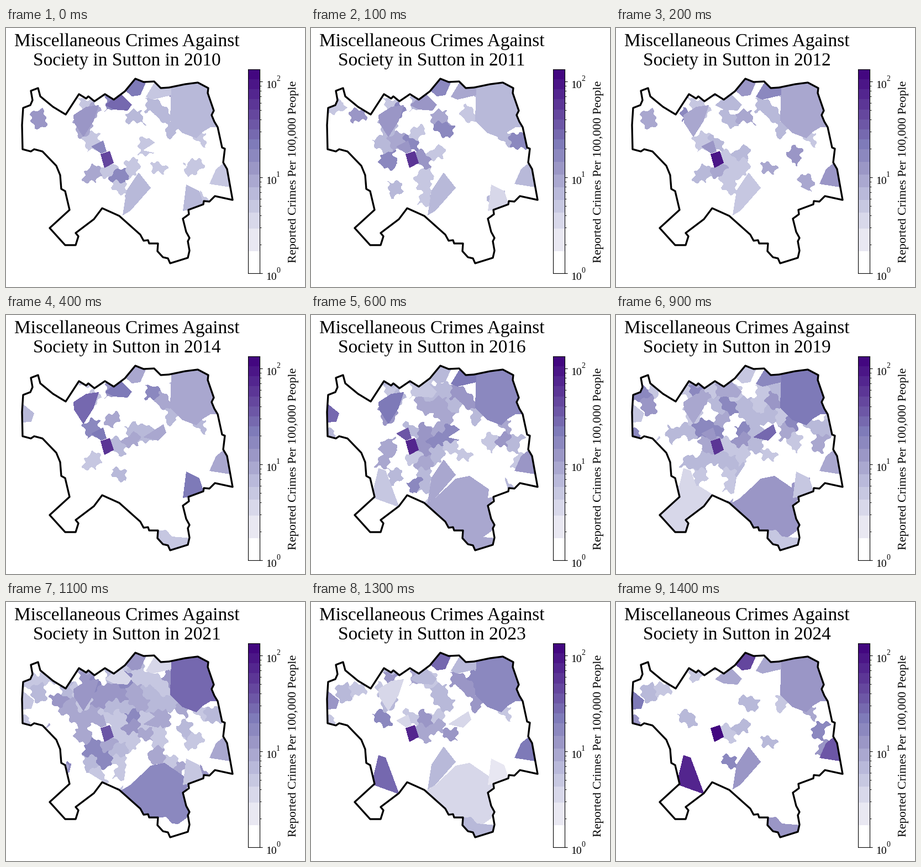
These frames come from a looping animation (541x470 px, 1500 ms). A matplotlib script:

```python
import matplotlib.pyplot as plt
import numpy as np
from matplotlib.animation import FuncAnimation
from matplotlib.patches import Polygon
from matplotlib.path import Path

W, H, DPI = 541, 470, 100
YEARS = np.arange(2010, 2025)
KEY_YEARS = (2010, 2012, 2014, 2016, 2018, 2021, 2024)
DECADE = 174  # pixels per factor of ten on the colour scale
BAR_LEFT, BAR_RIGHT, BAR_TOP, BAR_BASE = 438, 459, 75, 445
CELL = 25  # typical distance between neighbouring small areas
HUB = (220, 180)

plt.rcParams["font.family"] = "Liberation Serif"
rng = np.random.default_rng(12)

# Colour steps: wide at the pale end, then even
step_heights = [40, 41, 29] + [23] * 5 + [18.125] * 8
edges = BAR_BASE - np.cumsum([0] + step_heights)
middles = (edges[:-1] + edges[1:]) / 2
colours = plt.cm.Purples((BAR_BASE - middles) / (BAR_BASE - BAR_TOP))
colours[0] = 1

# Borough boundary, clockwise from the north-west corner
NORTH = [
    (45, 114), (58, 109), (62, 124), (85, 143), (108, 157), (132, 120),
    (145, 128), (149, 124), (160, 133), (179, 120), (195, 130), (215, 115),
    (234, 92), (249, 98), (268, 97), (280, 109), (295, 108), (324, 102),
    (347, 99), (366, 109)]
EAST = [
    (365, 118), (376, 150), (372, 158), (377, 170), (383, 180), (391, 217),
    (396, 219), (393, 244), (400, 256), (410, 312), (378, 305), (368, 315),
    (358, 314), (357, 320), (330, 330)]
SOUTH = [
    (331, 338), (320, 346), (326, 370), (332, 381), (329, 387), (332, 404),
    (329, 417), (297, 427), (293, 418), (284, 416), (274, 405), (275, 391),
    (259, 391), (257, 385), (249, 386), (243, 375), (205, 341), (174, 327),
    (159, 347)]
WEST = [
    (126, 372), (131, 378), (126, 394), (107, 394), (79, 363), (115, 330),
    (107, 296), (100, 292), (98, 267), (91, 250), (66, 224), (51, 220),
    (45, 224), (30, 220), (29, 176), (31, 145), (44, 140), (48, 131)]
BOUNDARY = NORTH + EAST + SOUTH + WEST

px, py = np.meshgrid(np.arange(W) + 0.5, np.arange(H) + 0.5)
# Ripples make the borders between small areas ragged
ragged_x = px + 2.5 * np.sin(py / 2.4) + 2 * np.sin(py / 6)
ragged_y = py + 2.5 * np.sin(px / 2.4) + 2 * np.sin(px / 6)


def small_areas():
    """Label each pixel with its nearest site on a shaken grid."""
    sites = [(x + CELL / 2 * (row % 2), y)
             for row, y in enumerate(np.arange(85, 440, CELL))
             for x in np.arange(20, 420, CELL)]
    sites = np.array(sites) + rng.uniform(-10, 10, (len(sites), 2))
    labels = np.zeros((H, W), int)
    nearest = np.full((H, W), np.inf)
    for k, (x, y) in enumerate(sites):
        gap = np.hypot(ragged_x - x, ragged_y - y)
        labels[gap < nearest] = k
        nearest = np.minimum(gap, nearest)
    return labels, sites


def small_levels(sites):
    """Crimes are recorded more often near the hub and in busier years."""
    busy = np.interp(YEARS, KEY_YEARS, (0.45, 0.45, 0.45, 0.65, 0.75, 0.9, 0.35))
    distance = np.hypot(*(sites - HUB).T)
    chance = busy[:, None] * np.exp(-(distance / 170) ** 2)
    # Each area keeps a habit of its own, varied from year to year
    draw = 0.5 * rng.random(len(sites)) + 0.5 * rng.random(chance.shape)
    level = np.minimum(2 + rng.geometric(0.4, chance.shape), 7)
    return np.where(draw < chance, level, 0)


labels, sites = small_areas()
levels = small_levels(sites)


def area(key_levels, *corners):
    """Lay a prominent area over the small ones."""
    global levels
    inside = Path(corners).contains_points(np.c_[px.ravel(), py.ravel()])
    labels[inside.reshape(H, W)] = levels.shape[1]
    row = np.rint(np.interp(YEARS, KEY_YEARS, key_levels)).astype(int)
    levels = np.c_[levels, row]


# North-east
area((4, 5, 5, 7, 8, 9, 6), (299, 95), (375, 95), (390, 180), (370, 180),
     (357, 188), (344, 200), (318, 190), (297, 168))
area((3, 7, 0, 8, 9, 2, 5), (253, 125), (271, 95), (299, 100), (299, 122), (265, 130))
area((8, 6, 5, 4, 2, 6, 11), (234, 85), (254, 97), (243, 122), (228, 124), (214, 112))
# North-west
area((9, 4, 8, 3, 7, 2, 5), (179, 140), (206, 118), (228, 139), (220, 150), (195, 148))
area((6, 5, 9, 8, 5, 6, 0), (122, 158), (145, 143), (168, 140), (158, 170),
     (140, 198), (123, 172))
area((0, 0, 4, 9, 3, 3, 8), (25, 157), (51, 178), (46, 194), (25, 195))
# Town centre
area((7, 6, 8, 10, 6, 5, 0), (154, 215), (176, 204), (182, 224), (172, 228))
area((11, 14, 12, 13, 13, 10, 15), (171, 229), (188, 223), (195, 245), (178, 254))
area((0, 0, 5, 0, 11, 5, 0), (248, 222), (285, 198), (290, 214), (275, 228))
# South and east
area((0, 0, 0, 5, 5, 7, 0), (203, 345), (225, 332), (262, 297), (287, 292),
     (335, 325), (322, 346), (336, 385), (305, 408), (240, 390))
area((4, 3, 0, 5, 0, 0, 6), (240, 262), (262, 290), (225, 332), (211, 340), (218, 295))
area((0, 0, 3, 5, 4, 0, 6), (270, 392), (290, 390), (300, 402), (335, 405),
     (330, 430), (280, 430))
area((4, 0, 8, 0, 3, 3, 0), (326, 284), (350, 296), (359, 325), (320, 332))
area((3, 6, 5, 6, 5, 5, 10), (380, 256), (400, 240), (412, 290), (368, 283))
# South-west
area((0, 0, 0, 0, 3, 0, 0), (110, 310), (150, 310), (174, 325), (160, 360),
     (140, 400), (70, 400), (70, 355))
area((0, 0, 0, 3, 3, 0, 13), (112, 320), (122, 278), (135, 282), (160, 349), (113, 332))

fig = plt.figure(figsize=(W / DPI, H / DPI), dpi=DPI, facecolor="white")
ax = fig.add_axes([0, 0, 1, 1])
ax.axis("off")
picture = ax.imshow(colours[levels[0][labels]], extent=(0, W, H, 0),
                    aspect="auto", interpolation="nearest")
picture.set_clip_path(Polygon(BOUNDARY, transform=ax.transData))
ax.add_patch(Polygon(BOUNDARY, fill=False, edgecolor="black", linewidth=2.4,
                     joinstyle="round"))

ax.text(218.5, 33, "Miscellaneous Crimes Against", size=24, ha="center")
title = ax.text(218.5, 68, "", size=24, ha="center")
ax.text(525, 261, "Reported Crimes Per 100,000 People", size=16, rotation=90,
        rotation_mode="anchor", ha="center", va="baseline")
for power in range(3):
    y = BAR_BASE - DECADE * power
    ax.text(470, y + 12, "10", size=14)
    ax.text(489, y - 0.5, str(power), size=9.8)

# Colour scale
bar = fig.add_axes([BAR_LEFT / W, 1 - BAR_BASE / H,
                    (BAR_RIGHT - BAR_LEFT) / W, (BAR_BASE - BAR_TOP) / H])
values = 10 ** ((BAR_BASE - edges) / DECADE)
for low, high, colour in zip(values, values[1:], colours):
    bar.axhspan(low, high, facecolor=colour, edgecolor="none", antialiased=False)
bar.set_yscale("log")
bar.set(xlim=(0, 1), ylim=(values[0], values[-1]), xticks=[])
bar.yaxis.tick_right()
bar.tick_params(axis="y", which="both", labelright=False)


def update(i):
    picture.set_data(colours[levels[i][labels]])
    title.set_text(f"Society in Sutton in {YEARS[i]}")
    return picture, title


anim = FuncAnimation(fig, update, frames=len(YEARS), interval=100,
                     repeat=True, repeat_delay=0)
plt.show()
```
